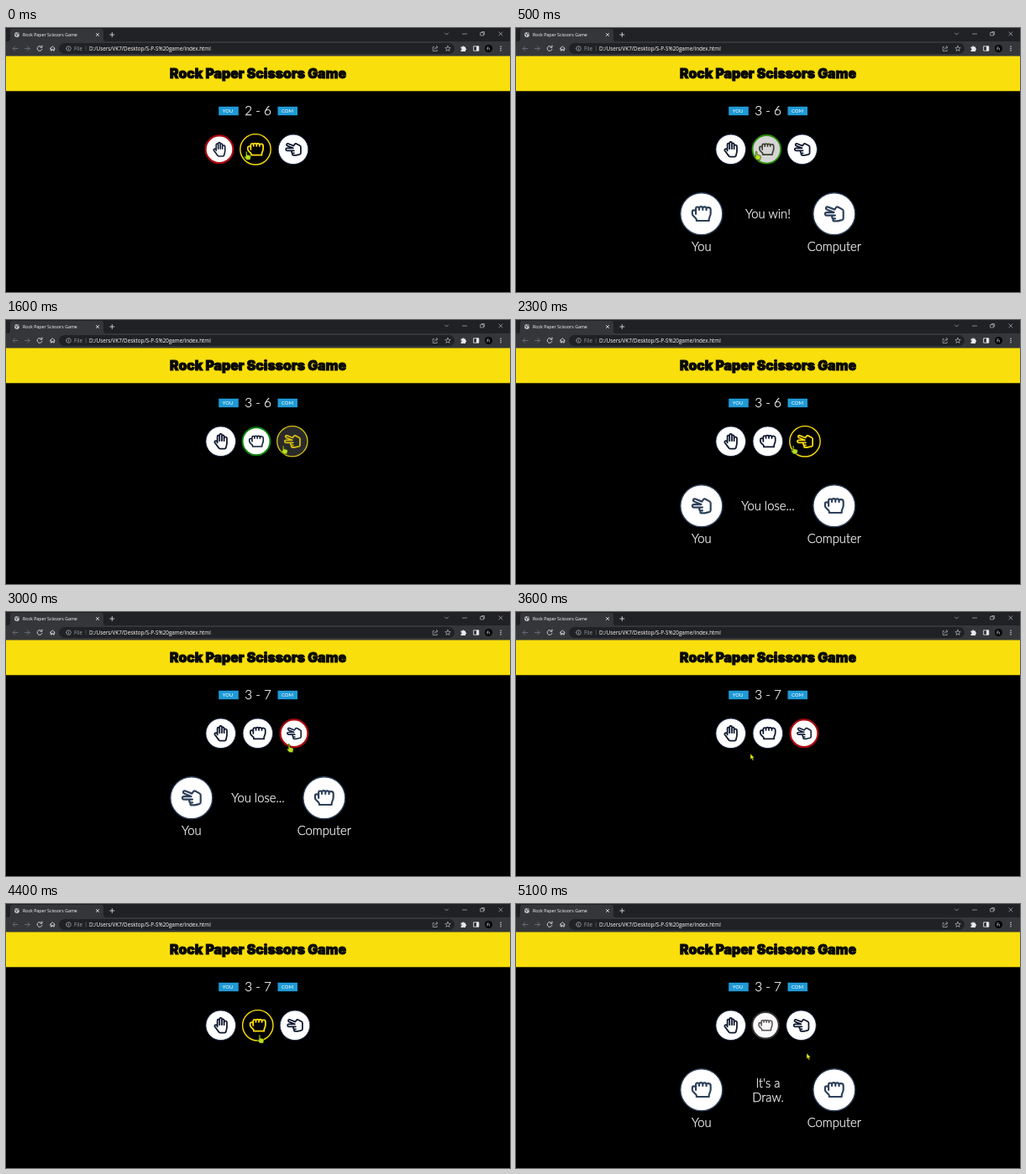
These frames come from a looping animation (600x315 px, 5200 ms). An HTML page:

```html
<!DOCTYPE html>
<html lang="en">
<head>
<meta charset="utf-8">
<title>Rock Paper Scissors Game</title>
<style>
html, body { margin: 0; width: 100%; height: 100%; overflow: hidden; background: #000; }
svg { display: block; }
text { fill: #fff; font-family: Quicksand, Lato, sans-serif; }
.ui text { font-family: "Open Sans", "Noto Sans", sans-serif; font-size: 6.3px; }
.line { fill: none; stroke: #d5d7db; stroke-width: .9; stroke-linecap: round; stroke-linejoin: round; }
.thin { stroke: #b4b6ba; stroke-width: .7; }
.dim { stroke: #6d7074; }
.icon { fill: none; stroke-width: 46; stroke-linecap: round; stroke-linejoin: round; }
.mid { text-anchor: middle; }
.big { font-size: 14.8px; font-weight: 300; stroke: #fff; stroke-width: .25; }
.tag { font-size: 5.9px; }
</style>
</head>
<body>
<svg width="600" height="315" viewBox="0 0 600 315">
  <defs>
    <path id="paper" transform="translate(-218 -256)" d="M112 300V100c0-44 68-44 68 0V58c0-46 72-46 72 0V92c4-40 68-38 68 8V150c6-38 88-36 88 10V300c0 30-4 50-12 76l-14 60c-4 30-20 52-50 52H210c-24 0-40-8-54-28L36 300c-28-42 30-84 60-44l16 24M180 100V240M252 92V240M320 110V240"/>
    <path id="rock" transform="translate(-256 -262)" d="M130 436V410c0-14-6-24-16-34L52 316c-18-18-28-36-28-60v-50c0-50 78-50 90-4V124c0-50 78-48 84-8c8-52 84-52 90 0c10-46 84-44 90 8c14-40 110-36 110 26V250c0 34-10 58-24 88c-12 26-18 40-18 66v32ZM114 200v66M198 116v44M288 116v44M378 124v40"/>
    <path id="scissors" transform="translate(-256 -268)" d="M250 228L76 158c-50-20-26-84 22-66L268 158L300 112c14-22 36-26 58-14l100 54c18 10 30 24 30 46V380c0 22-14 38-36 44L340 450c-8 2-14 2-20 2H262c-48 0-48-66-4-66H240c-52 0-52-80 0-80H64c-52 0-52-74 0-74H250ZM240 306h40M258 386h24"/>
  </defs>

  <g class="ui">
    <rect width="600" height="34" fill="#35363a"/>
    <rect width="600" height="16" fill="#202124"/>
    <path d="M2 16q3 0 3-3V4q0-3 3-3H113q3 0 3 3V13q0 3 3 3Z" fill="#35363a"/>
    <circle cx="13" cy="8" r="2.9" fill="#c4c6ca"/>
    <path d="M10.8 7l2 .8l-.4 2M13.2 5.3l.6 1.5l1.8.4" fill="none" stroke="#35363a" stroke-width=".9"/>
    <text x="20" y="10" style="font-size:5.3px">Rock Paper Scissors Game</text>
    <path class="line" d="M107.3 6.3l3.4 3.4m0-3.4l-3.4 3.4M123.8 8h5m-2.5-2.5v5"/>
    <path class="line thin" d="M522.5 6l2 2l2-2M543.5 7h5M565 5.6h3.4v3.4H565ZM566.2 5.4v-.9h3.4v3.4h-1M586.8 4.8l4.2 4.2m0-4.2l-4.2 4.2"/>
    <path class="line dim" d="M14 24.5H8.3m2.5-2.6l-2.6 2.6l2.6 2.6M22.5 24.5h5.6m-2.5-2.6l2.6 2.6l-2.6 2.6"/>
    <path class="line" d="M42.4 22.7a2.9 2.9 0 1 0 .5 2.6M43 21v2.2h-2.2M52.4 24.5l2.9-2.7l2.9 2.7M53.2 24v3h1.3v-1.6h1.6v1.6h1.3V24"/>
    <rect x="63" y="18" width="471" height="13" rx="6.5" fill="#202124"/>
    <path class="line thin" d="M71.7 24.5a2.8 2.8 0 1 0 5.6 0a2.8 2.8 0 1 0-5.6 0M74.5 24.3v1.6m0-3v.1"/>
    <text x="81" y="26.8" style="fill:#9aa0a6">File</text>
    <path d="M95.2 21.5v6" stroke="#5f6368" stroke-width=".7"/>
    <text x="99" y="26.8">D:/Users/VK7/Desktop/S-P-S%20game/index.html</text>
    <path class="line thin" d="M509.5 22.5h-1.3v5h5v-1.5M510 25.5q.3-2.6 3.6-2.7m-1.3-1.5l1.6 1.5l-1.6 1.5M526 21.3l.9 2.1l2.3.2l-1.8 1.5l.6 2.3l-2-1.2l-2 1.2l.6-2.3l-1.8-1.5l2.3-.2Z"/>
    <path fill="#e8eaed" d="M541.5 22.5h1.7a1.1 1.1 0 0 1 2.2 0h1.6v1.7a1.1 1.1 0 0 1 0 2.2v1.6h-5.5v-1.6a1.1 1.1 0 0 0 0-2.2Z"/>
    <rect x="557" y="21.8" width="5.8" height="5.4" class="line"/>
    <rect x="560" y="21.8" width="2.8" height="5.4" fill="#e8eaed"/>
    <circle cx="574.5" cy="24.5" r="4.6" fill="#050505"/>
    <path d="M573 26.2v-3.4h1.4m-1.4 1.6h1.2m1.3 1.8v-2" class="line thin"/>
    <g fill="#e8eaed"><circle cx="589" cy="22.2" r=".7"/><circle cx="589" cy="24.5" r=".7"/><circle cx="589" cy="26.8" r=".7"/></g>
  </g>

  <rect y="33.5" width="600" height="41.8" fill="#f9df0b"/>
  <text class="mid" x="300" y="60.2" style="font:900 15.8px Inter,sans-serif;fill:#080808;stroke:#080808;stroke-width:.9">Rock Paper Scissors Game</text>

  <rect x="253.2" y="93.8" width="23.6" height="10.4" fill="#1f9ad6"/>
  <rect x="323.5" y="93.8" width="23.5" height="10.4" fill="#1f9ad6"/>
  <text class="mid tag" x="264" y="101.4">YOU</text>
  <text class="mid tag" x="335" y="101.4">COM</text>
  <text class="mid big" id="score" x="300" y="104.3" style="font-size:15.3px"></text>

  <g id="buttons"></g>

  <g id="result">
    <g fill="#fff" stroke="#2d4059" stroke-width="1.4"><circle cx="220.8" cy="221.8" r="25"/><circle cx="378.8" cy="221.8" r="25"/></g>
    <g class="icon" stroke="#2d4059">
      <use id="mine" transform="translate(220.8 221.8) scale(.047)"/>
      <use id="theirs" transform="translate(378.8 221.8) scale(.047)"/>
    </g>
    <text class="mid big" x="220.8" y="266.4">You</text>
    <text class="mid big" x="378.8" y="266.4">Computer</text>
    <text class="mid big" id="line1" x="300"></text>
    <text class="mid big" id="line2" x="300" y="236.3"></text>
  </g>

  <g id="cursor" stroke="#1c2a06" stroke-width=".6" stroke-linejoin="round">
    <path id="hand" fill="#b9e01c" d="M0 0q1.3-.5 1.5.8v3l3.4.8q1.2.4 1 1.7l-.7 3.6H.9L-1.8 6.5q-.2-1.3 1.4-.6l.3.3Z"/>
    <path id="arrow" fill="#f0ee16" d="M0 0v6.8l1.5-1.2l1.2 2.6l1.3-.6l-1.2-2.5h2Z"/>
  </g>
</svg>
<script>
const LOOP = 5200, FADE = 400;
const $ = id => document.getElementById(id);

// radius, border width, fill, border, icon
const looks = {
  norm:  [17.8, .9,  [255, 255, 255], [24, 38, 68],   [12, 22, 44]],
  hover: [18.2, 1.4, [0, 0, 0],       [250, 222, 12], [250, 222, 12]],
  win:   [16.5, 2,   [255, 255, 255], [6, 128, 10],   [22, 34, 58]],
  lose:  [16.4, 2.2, [255, 255, 255], [172, 10, 14],  [22, 34, 58]],
  draw:  [15.8, 2,   [250, 250, 250], [52, 48, 48],   [88, 80, 86]]
};

// start time, look, centre x
const buttons = {
  paper: [[0, "lose", 254], [100, "norm", 255.7]],
  rock: [[0, "hover", 297], [50, "hover", 300], [300, "win", 298], [1900, "norm", 299.8],
    [3950, "hover", 299.8], [4500, "draw", 297]],
  scissors: [[0, "norm", 342], [50, "norm", 344], [300, "norm", 340], [1400, "hover", 341],
    [1900, "hover", 344], [2300, "lose", 343], [3950, "norm", 344], [4500, "norm", 339.5]]
};

// start, end, own hand, other hand, message lines
const rounds = [
  [200, 1500, "rock", "scissors", "You win!"],
  [2200, 3600, "scissors", "rock", "You lose..."],
  [4450, LOOP, "rock", "rock", "It's a", "Draw."]
];

// time, tip x, tip y
const path = [[0, 285.5, 147.4], [1250, 285.5, 147.4], [1500, 329.4, 150], [2900, 329.4, 150],
  [3100, 343, 165], [3300, 315, 180], [3500, 279, 169], [3650, 279, 169], [4000, 300, 158],
  [4200, 301.2, 156.2], [4500, 301.2, 156.2], [4850, 298, 157], [5090, 298, 157],
  [5091, 346, 178], [LOOP, 346, 178]];

const mix = (a, b, p) => Array.isArray(a) ? a.map((v, i) => mix(v, b[i], p)) : a + (b - a) * p;
const ease = p => 1 - Math.pow(1 - p, 2.6);
const rgb = c => `rgb(${c.map(Math.round)})`;

for (const name in buttons) {
  $("buttons").innerHTML += `<g id="${name}Button"><circle cy="144.8"/><use class="icon" href="#${name}"/></g>`;
}

// Each change starts from wherever the preceding one settled.
function pose(keys, t) {
  const i = keys.findLastIndex(k => k[0] <= t);
  const at = k => [...looks[k[1]], k[2]];
  if (!i) return at(keys[0]);
  const p = ease(Math.min(1, (t - keys[i][0]) / FADE));
  return mix(at(keys[i - 1]), at(keys[i]), p);
}

function drawButton(name, t) {
  const [r, width, fill, border, ink, x] = pose(buttons[name], t);
  const [circle, icon] = $(name + "Button").children;
  circle.setAttribute("cx", x);
  circle.setAttribute("r", r);
  circle.setAttribute("fill", rgb(fill));
  circle.setAttribute("stroke", rgb(border));
  circle.setAttribute("stroke-width", width);
  icon.setAttribute("transform", `translate(${x} 144.8) scale(${.038 * r / 17.6})`);
  icon.setAttribute("stroke", rgb(ink));
}

function drawResult(t) {
  const round = rounds.find(r => t >= r[0] && t < r[1]);
  $("result").style.display = round ? "" : "none";
  if (!round) return;
  const [, , mine, theirs, first, second = ""] = round;
  $("mine").setAttribute("href", "#" + mine);
  $("theirs").setAttribute("href", "#" + theirs);
  $("line1").textContent = first;
  $("line1").setAttribute("y", second ? 218.5 : 227.3);
  $("line2").textContent = second;
}

function drawCursor(t) {
  const i = path.findIndex(k => k[0] > t);
  const a = path[i - 1], b = path[i];
  const [, x, y] = mix(a, b, (t - a[0]) / (b[0] - a[0]));
  const over = y < 163;
  $("cursor").setAttribute("transform", `translate(${x} ${y})`);
  $("hand").style.display = over ? "" : "none";
  $("arrow").style.display = over ? "none" : "";
}

function frame() {
  const t = performance.now() % LOOP;
  for (const name in buttons) drawButton(name, t);
  $("score").textContent = `${t < 350 ? 2 : 3} - ${t < 2350 ? 6 : 7}`;
  drawResult(t);
  drawCursor(t);
  requestAnimationFrame(frame);
}
frame();
</script>
</body>
</html>
```
